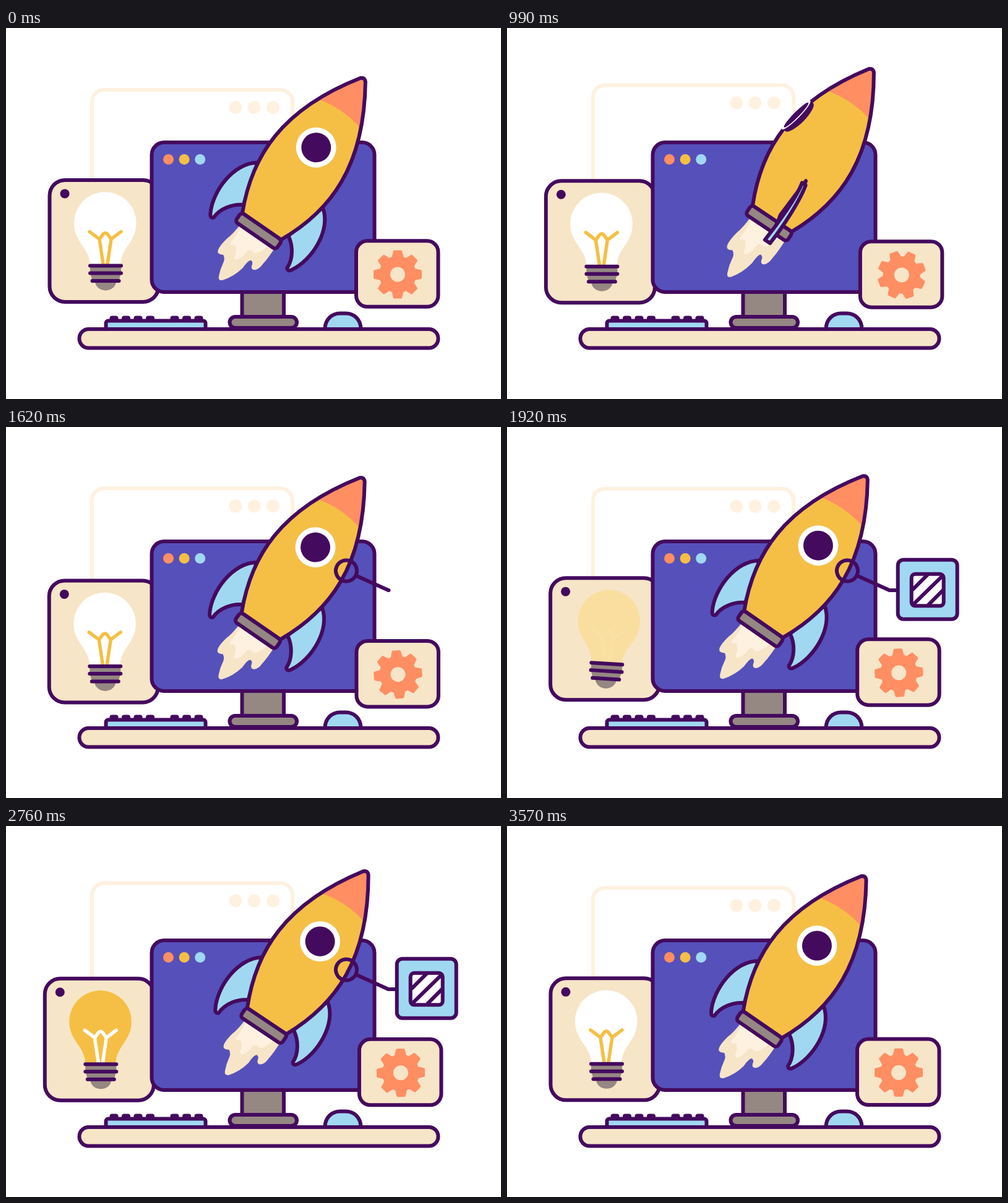
An HTML page with a canvas for the animation above (3.6 s loop, 800 by 600 pixels).

```html
<!DOCTYPE html>
<html lang="en">
<head>
<meta charset="utf-8">
<title>Rocket launch</title>
<style>
html, body { margin: 0; width: 100%; height: 100%; overflow: hidden; background: #fff; }
canvas { display: block; }
</style>
</head>
<body>
<canvas id="stage" width="800" height="600"></canvas>
<script>
const ctx = document.getElementById('stage').getContext('2d');
const LOOP = 3600, ORBIT = 1800, TAU = Math.PI * 2, DEG = Math.PI / 180;
const INK = '#440a5e', BLUE = '#5650ba', YELLOW = '#f5bf45', ORANGE = '#ff8e63',
      SKY = '#a0d8f2', CREAM = '#f7e5c7', PALE = '#fff1e0', GRAY = '#958782', WHITE = '#fff';

const clamp = u => Math.max(0, Math.min(1, u));
const smooth = u => u * u * (3 - 2 * u);
const ramp = (t, a, b) => clamp((t - a) / (b - a));

// Eased values between [time, value] pairs.
function keys(t, list) {
  for (let i = 1; i < list.length; i++) {
    const [t0, v0] = list[i - 1], [t1, v1] = list[i];
    if (t <= t1) return v0 + (v1 - v0) * smooth(ramp(t, t0, t1));
  }
  return list[list.length - 1][1];
}

// Monotone curve through [time, value] pairs, without stops at the pairs.
function flow(t, list) {
  const last = list.length - 1;
  const slope = i => (list[i + 1][1] - list[i][1]) / (list[i + 1][0] - list[i][0]);
  const tangent = i => {
    if (i === 0 || i === last) return 0;
    const a = slope(i - 1), b = slope(i);
    return 2 * a * b / (a + b);
  };
  let i = 0;
  while (i < last - 1 && t > list[i + 1][0]) i++;
  const [t0, v0] = list[i], [t1, v1] = list[i + 1];
  const h = t1 - t0, u = (t - t0) / h, w = 1 - u;
  return v0 * (1 + 2 * u) * w * w + v1 * u * u * (3 - 2 * u)
    + h * (tangent(i) * u * w * w - tangent(i + 1) * u * u * w);
}

function paint(path, fill, stroke, width = 6) {
  if (fill) { ctx.fillStyle = fill; ctx.fill(path); }
  if (stroke) { ctx.strokeStyle = stroke; ctx.lineWidth = width; ctx.stroke(path); }
}
const svg = (d, fill, stroke, width) => paint(new Path2D(d), fill, stroke, width);
function box(x0, y0, x1, y1, r, fill, stroke) {
  const p = new Path2D();
  p.roundRect(x0, y0, x1 - x0, y1 - y0, r);
  paint(p, fill, stroke);
}
function oval(x, y, rx, ry, fill) {
  const p = new Path2D();
  p.ellipse(x, y, rx, ry, 0, 0, TAU);
  paint(p, fill);
}
const dot = (x, y, r, fill) => oval(x, y, r, r, fill);
function at(x, y, draw) {
  ctx.save();
  ctx.translate(x, y);
  draw();
  ctx.restore();
}
function mix(a, b, u) {
  const part = (c, i) => parseInt(c.slice(1 + 2 * i, 3 + 2 * i), 16);
  return `rgb(${[0, 1, 2].map(i => Math.round(part(a, i) + (part(b, i) - part(a, i)) * u))})`;
}

function ghostWindow() {
  box(139, 100, 463, 300, 19, null, PALE);
  for (const x of [371, 401, 431.5]) dot(x, 128.5, 10.5, PALE);
}

function bulb(t) {
  const lit = ramp(t, 1860, 1980) * (1 - ramp(t, 3210, 3330));
  const tilt = keys(t, [[1800, 0], [1950, 4], [2130, -4], [2310, 0]]);
  ctx.save();
  ctx.translate(160, 395);
  ctx.rotate(tilt * DEG);
  ctx.translate(-160, -395);
  svg('M136 382 C135 355 110 346 110 315 A50 50 0 0 1 210.500 315 C210.500 346 186 355 185 382 Z',
    mix('#ffffff', YELLOW, lit));
  svg('M135 329 L151 341 Q154 337 157 333 Q160.500 329 164 333 Q167 337 170 341 L186 329 ' +
    'M151 341 L157 381 M170 341 L164 381', null, mix(YELLOW, '#ffffff', lit), 5.5);
  svg('M136 384 H186 V396 L182 409 H178 A17 15 0 0 1 144 409 H140 L136 396 Z', GRAY);
  svg('M136 384 H186 M136 396 H186 M139.500 408.500 H182.500', null, INK, 6);
  ctx.restore();
}

function bulbCard(t) {
  box(70.5, 245.5, 246.5, 442.5, 25, CREAM, INK);
  dot(95, 267.5, 7.5, INK);
  bulb(t);
}

function computer() {
  box(381.5, 420, 449, 470, 0, GRAY, INK);
  box(361.5, 467, 470, 485, 9, GRAY, INK);
  box(235.5, 185, 595.5, 427, 20, BLUE, INK);
  [ORANGE, YELLOW, SKY].forEach((c, i) => dot(262.5 + i * 25.6, 212.5, 8.5, c));
  for (const x of [174.5, 194, 213.5, 233, 272.5, 292, 311.5]) {
    box(x - 7, 465.5, x + 7, 474, [4, 4, 0, 0], INK);
  }
  box(161.5, 473.5, 322.5, 490, 4, SKY, INK);
  svg('M515.500 487 C515.500 471 527 461.500 540 461.500 H549 C562 461.500 573.500 471 573.500 487', SKY, INK);
  box(118.5, 487, 698.5, 517.5, 15, CREAM, INK);
}

function gearCard(t) {
  box(566, 344, 698.5, 450.5, 18, CREAM, INK);
  const turn = flow(t, [[0, 0], [510, 6], [990, 25], [1620, 130.5], [2220, 305], [2760, 359], [3600, 360]]);
  at(633, 398.3, () => {
    ctx.rotate(turn * DEG);
    dot(0, 0, 30, ORANGE);
    for (let i = 0; i < 8; i++) {
      svg('M-10 -26 L-7 -38 Q-6.500 -39 -5 -39 H5 Q6.500 -39 7 -38 L10 -26 Z', ORANGE);
      ctx.rotate(TAU / 8);
    }
    dot(0, 0, 12, CREAM);
  });
}

// Rocket parts use the nozzle centre as origin, with the nose pointing up.
const BODY = new Path2D('M-38 -9 C-78 -93 -81.500 -183 -5 -297 Q0 -302 5 -297 C81.500 -183 78 -93 38 -9 Z');
const FIN = new Path2D('M-64 -90 C-96 -68 -98 -10 -80 21 Q-76 28 -72 23 C-72 6 -60 -12 -44 -21 Z');

function fin(side, c, s) {
  const k = -side * c, thick = Math.abs(s);
  const face = new Path2D();
  face.addPath(FIN, new DOMMatrix([k, 0, 0, 1, 0, 0]));
  paint(face, SKY, INK);
  if (thick < 0.1) return;
  // The outer edge of the fin, seen from the side.
  const top = 3.5 * thick, low = 5 * thick, rim = new Path2D();
  rim.moveTo(-64 * k - top, -84);
  rim.bezierCurveTo(-96 * k - top, -62, -98 * k - low, -10, -80 * k - low, 26);
  rim.lineTo(-80 * k + low, 26);
  rim.bezierCurveTo(-98 * k + low, -10, -96 * k + top, -62, -64 * k + top, -84);
  rim.closePath();
  paint(rim, SKY, INK);
}

function porthole(c, s) {
  if (c <= 0) return;
  const edge = Math.abs(s);
  const rim = (x, draw) => at(x * s, -164 - 6 * edge, () => {
    ctx.rotate(-11 * s * DEG);
    draw();
  });
  rim(56, () => oval(0, 0, 32 * c + 4 * edge, 32, INK));
  rim(62, () => {
    oval(0, 0, 32.5 * c, 32.5, WHITE);
    oval(0, 0, 24 * c, 24 + 4 * edge, INK);
  });
}

function flame(t, boost) {
  ctx.save();
  ctx.scale(1, 1 + 0.09 * boost + 0.015 * Math.sin(TAU * t / 600));
  svg('M-30 5 Q-31 28 -35 39 Q-40 64 -33 66.500 Q-29 67 -25 64 Q-18 68 -17.500 76 Q-16 86 -12 95 ' +
    'Q-9 104 -3 99 Q9 84 13 64 Q13 48 17 46 Q22 46 23 53 Q26 59 31 55 Q36 50 36 40 Q38 27 37 5 Z', CREAM);
  svg('M-28 5 Q-25 24 -26 36 Q-27 46 -23 44 Q-19 39 -16 42 Q-10 47 -9 55 Q-7 61 -3 58 ' +
    'Q4 50 3 38 Q6 31 11 33 Q17 36 22 24 L29 5 Z', PALE);
  ctx.restore();
}

function rocket(t) {
  const local = t % ORBIT, phase = TAU * local / ORBIT;
  const u = ramp(t, 0, 1500);
  const half = x => 0.5 * Math.pow(2 * x, 2.1);
  const spin = TAU * (u < 0.5 ? half(u) : 1 - half(1 - u));
  const c = Math.cos(spin), s = Math.sin(spin);
  const boost = smooth(ramp(t, 0, 450)) * (1 - smooth(ramp(t, 1110, 1500)));
  const drift = 3.65 * (1 - Math.cos(phase)) + 3.25 * Math.sin(phase) + 7.6 * boost;
  const sway = keys(local, [[0, 0], [450, 0.9], [900, -0.9], [1350, 0]]);

  at(493.3 + drift, 204.8 - drift, () => {
    ctx.rotate((34.6 + sway) * DEG);
    ctx.translate(0, 150);
    const inFront = side => -side * s > 0.02;
    for (const side of [-1, 1]) if (!inFront(side)) fin(side, c, s);
    flame(t, boost);
    ctx.fillStyle = YELLOW;
    ctx.fill(BODY);
    ctx.save();
    ctx.clip(BODY);
    svg('M-60 -222 L-42 -230 Q0 -241 42 -230 L60 -222 V-310 H-60 Z', ORANGE);
    ctx.restore();
    paint(BODY, null, INK);
    box(-40, -9, 40, 9, 5, GRAY, INK);
    porthole(c, s);
    for (const side of [-1, 1]) if (inFront(side)) fin(side, c, s);
  });
}

function callout(t) {
  const ring = ramp(t, 1350, 1530) * (1 - ramp(t, 3480, 3555));
  const wire = ramp(t, 1530, 1640) * (1 - ramp(t, 3405, 3480));
  const tile = smooth(ramp(t, 1665, 1900)) * (1 - smooth(ramp(t, 3270, 3405)));
  if (ring > 0) {
    const p = new Path2D();
    const start = 25 * DEG;
    p.arc(550, 232.5, 17, start, start + TAU * ring);
    paint(p, null, INK);
  }
  if (wire > 0) {
    const a = Math.min(1, wire / 0.82), b = ramp(wire, 0.82, 1);
    svg(`M566 240.500 L${566 + 52 * a} ${240.5 + 23.5 * a}` + (b > 0 ? ` L${618 + 13 * b} 264` : ''), null, INK);
  }
  if (tile > 0) at(679.7, 262.8, () => {
    ctx.scale(tile, tile);
    box(-48, -48, 48, 48, 9, SKY, INK);
    box(-26, -25, 26, 26.5, 6, WHITE);
    svg('M-24 0 L0 -24 M-22 23 L24 -22 M2 24 L25 1', null, INK, 6);
    box(-26, -25, 26, 26.5, 6, null, INK);
  });
}

function draw(t) {
  const phase = TAU * t / ORBIT, lift = 1 - Math.cos(phase), swing = Math.sin(phase);
  ctx.fillStyle = WHITE;
  ctx.fillRect(0, 0, 800, 600);
  ctx.lineCap = ctx.lineJoin = 'round';
  at(0, -3.8 * lift, ghostWindow);
  at(-3.9 * lift, 0.4 - 4.3 * swing, () => bulbCard(t));
  computer();
  rocket(t);
  at(2.5 * lift, 0.3 - 2.7 * swing, () => gearCard(t));
  callout(t);
}

const begin = performance.now();
function tick() {
  draw((performance.now() - begin) % LOOP);
  requestAnimationFrame(tick);
}
tick();
</script>
</body>
</html>
```
